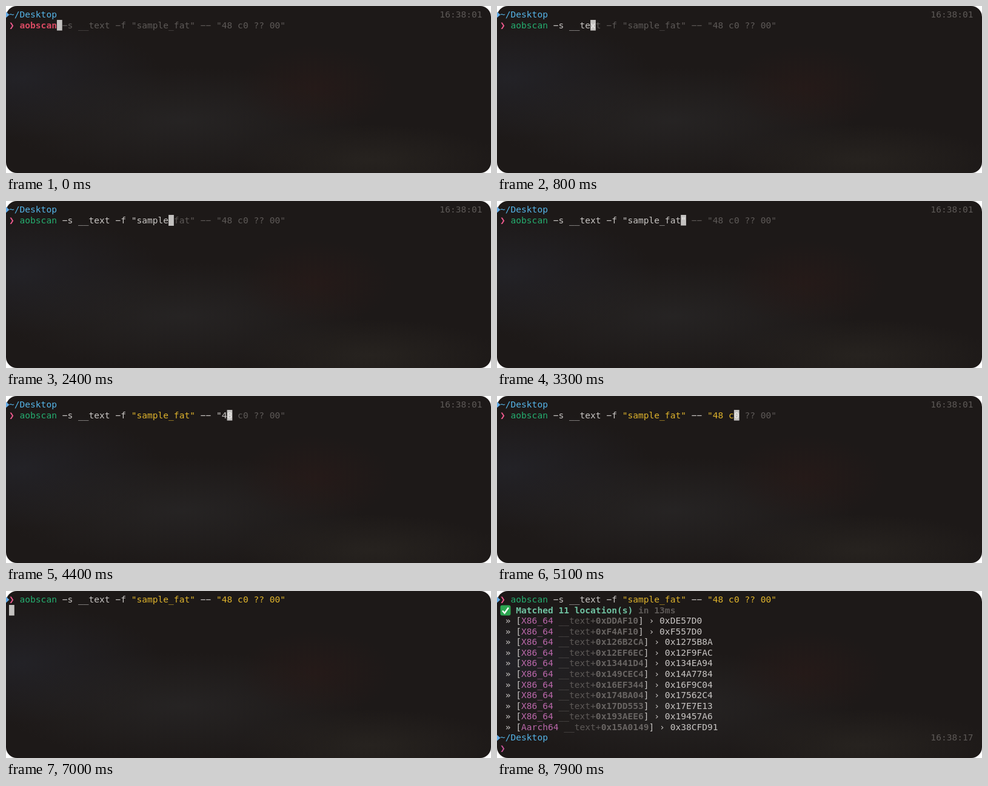
An HTML page with a canvas for the animation above (8 s loop, 800 px wide and 276 px high).

```html
<!DOCTYPE html>
<html lang="en">
<head>
<meta charset="utf-8">
<title>Terminal byte scan</title>
<style>
html, body { margin: 0; width: 100%; height: 100%; overflow: hidden; background: #fff; }
canvas { display: block; }
</style>
</head>
<body>
<canvas id="stage" width="800" height="276"></canvas>
<script>
const ctx = document.getElementById('stage').getContext('2d');
const LOOP = 8000, ENTER = 6800, DONE = 7100, BLINK = 7600;
const CELL = 8.77, LINE = 17.57, LEFT = 5, TOP = 5.4;
const C = {
  text: '#c9c6c4', dim: '#5d5957', blue: '#55b5e8', pink: '#ee5a8e', red: '#d84a62',
  green: '#25ae70', yellow: '#deb32c', teal: '#70c3a2', purple: '#bb68ab', cursor: '#c4c2c0'
};
const COMMAND = 'aobscan -s __text -f "sample_fat" -- "48 c0 ?? 00"';
// [time in ms, characters typed]
const TYPING = [[0, 7], [800, 15], [2400, 28], [4400, 39], [5900, 47], [6400, 50], [LOOP, 50]];
const MATCHES = `DDAF10 DE57D0
F4AF10 F557D0
126B2CA 1275B8A
12EF6EC 12F9FAC
13441D4 134EA94
149CEC4 14A7784
16EF344 16F9C04
174BA04 17562C4
17DD553 17E7E13
193AEE6 19457A6
15A0149 38CFD91`.split('\n').map(s => s.split(' '));

// Draws text on the character grid and returns the next free column.
function put(text, col, row, color, bold = false) {
  ctx.font = `${bold ? 'bold ' : ''}14.57px "DejaVu Sans Mono", monospace`;
  ctx.fillStyle = color;
  for (const ch of text) {
    ctx.fillText(ch === '-' ? '\u2212' : ch, LEFT + col * CELL, TOP + row * LINE + 13.6);
    col++;
  }
  return col;
}

function cursor(col, row, under = '') {
  ctx.fillStyle = C.cursor;
  ctx.fillRect(LEFT + col * CELL, TOP + row * LINE, CELL, LINE);
  put(under, col, row, '#eeecea');
}

function mark(row) {
  const y = TOP + row * LINE + 9;
  ctx.fillStyle = '#67aee8';
  ctx.beginPath();
  ctx.moveTo(0, y - 5);
  ctx.lineTo(5.5, y);
  ctx.lineTo(0, y + 5);
  ctx.fill();
}

function glow(x, y, rx, ry, rgb, alpha) {
  ctx.save();
  ctx.translate(x, y);
  ctx.scale(rx, ry);
  const g = ctx.createRadialGradient(0, 0, 0, 0, 0, 1);
  g.addColorStop(0, `rgba(${rgb},${alpha})`);
  g.addColorStop(1, `rgba(${rgb},0)`);
  ctx.fillStyle = g;
  ctx.fillRect(-1, -1, 2, 2);
  ctx.restore();
}

function backdrop() {
  ctx.clearRect(0, 0, 800, 276);
  ctx.fillStyle = '#1d1918';
  ctx.beginPath();
  ctx.roundRect(0, 0, 800, 276, 18);
  ctx.fill();
  ctx.save();
  ctx.clip();
  glow(20, 120, 240, 100, '36,36,42', 0.8);
  glow(290, 190, 300, 90, '40,38,38', 0.8);
  glow(510, 135, 130, 70, '40,26,24', 0.7);
  glow(600, 255, 220, 60, '41,37,33', 0.8);
  ctx.restore();
}

function typed(t) {
  const i = TYPING.findIndex(([end]) => t < end);
  const [t0, n0] = TYPING[i - 1], [t1, n1] = TYPING[i];
  return Math.floor(n0 + (n1 - n0) * (t - t0) / (t1 - t0) + 1e-6);
}

function command(n, row) {
  const colorAt = i =>
    i >= n ? C.dim :
    i < 7 ? (n > 7 ? C.green : C.red) :
    i >= 21 && i < 33 && n >= 33 || i >= 37 && n > 40 ? C.yellow : C.text;
  put('❯', 0, row, C.pink, true);
  [...COMMAND].forEach((ch, i) => put(ch, i + 2, row, colorAt(i), n === 7 && i < 7));
}

function header(row, clock) {
  mark(row);
  put('~/Desktop', 0, row, C.blue);
  put(clock, 81, row, C.dim);
}

function check(row) {
  const y = TOP + row * LINE;
  ctx.fillStyle = '#2ca651';
  ctx.beginPath();
  ctx.roundRect(5.5, y + 0.5, 17, 17, 3);
  ctx.fill();
  ctx.strokeStyle = '#fff';
  ctx.lineWidth = 2.4;
  ctx.beginPath();
  ctx.moveTo(9, y + 9.5);
  ctx.lineTo(12.5, y + 13.5);
  ctx.lineTo(19, y + 4.5);
  ctx.stroke();
}

function results() {
  check(1);
  put('in 13ms', put('Matched 11 location(s) ', 3, 1, C.teal, true), 1, C.dim, true);
  MATCHES.forEach(([offset, address], i) => {
    const row = i + 2, arch = i < 10 ? 'X86_64' : 'Aarch64';
    let col = put(' » [', 0, row, C.text);
    col = put(arch, col, row, C.purple);
    col = put(' __text+', col, row, C.dim);
    col = put('0x' + offset, col, row, '#686462', true);
    put(`] › 0x${address}`, col, row, C.text);
  });
}

function draw(t) {
  backdrop();
  if (t < ENTER) {
    const n = typed(t);
    header(0, '16:38:01');
    command(n, 1);
    cursor(n + 2, 1, COMMAND[n]);
    return;
  }
  mark(0);
  command(COMMAND.length, 0);
  if (t < DONE) return cursor(0, 1);
  results();
  header(13, '16:38:17');
  put('❯', 0, 14, '#c9559b', true);
  if (t < BLINK) cursor(2, 14);
}

const start = performance.now();
function tick() {
  const t = (performance.now() - start) % LOOP;
  draw(Math.floor(t / 100) * 100);
  requestAnimationFrame(tick);
}
tick();
</script>
</body>
</html>
```
